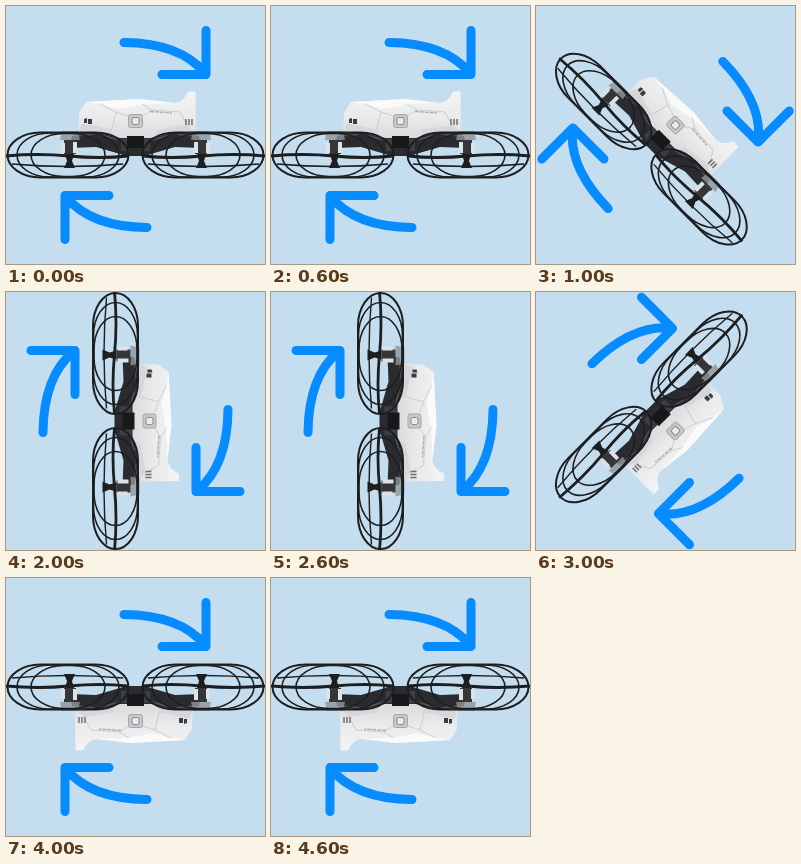
Animation, 259 px wide and 258 px high, one loop 5000 ms. Source, as an HTML page:

```html
<!DOCTYPE html>
<html lang="en">
<head>
<meta charset="utf-8">
<title>Turning drone</title>
<style>
  html, body { margin: 0; width: 100%; height: 100%; overflow: hidden; background: #c4ddef; }
  svg { display: block; width: 259px; height: 258px; }
</style>
</head>
<body>
<svg viewBox="0 0 259 258">
  <defs>
    <linearGradient id="shell" x2="0" y2="1">
      <stop offset="0" stop-color="#f4f4f5"/>
      <stop offset=".55" stop-color="#e9eaeb"/>
      <stop offset="1" stop-color="#d8dadc"/>
    </linearGradient>
    <g id="arrow" fill="none" stroke="#078cff" stroke-width="9" stroke-linecap="round" stroke-linejoin="round">
      <path d="M118 36.500Q174 37 199 67M156 68.500H200V24.500"/>
    </g>
    <g id="cage" fill="none" stroke="#1d1e20">
      <!-- motor post and rotor -->
      <path d="M56 125H72L74 134H54Z" fill="#8f9699" stroke="none" opacity=".8"/>
      <path d="M58 134H70V148H58Z" fill="#34363a" stroke="none"/>
      <path d="M55 137H59V147H55ZM67 136H71V147H67Z" fill="#dfe2e4" stroke="none"/>
      <path d="M59 148H68L66 155L69 162H58L61 155Z" fill="#1d1e20" stroke="none"/>
      <path d="M0 150Q32 147 63 150Q94 153 122 150" stroke-width="2.800"/>
      <!-- guard hoops -->
      <g id="hoops"></g>
      <path d="M6 158Q62 163 117 158" stroke-width="1.400"/>
    </g>
  </defs>
  <g id="scene">
    <use href="#arrow"/>
    <use href="#arrow" transform="rotate(180 129.500 129)"/>

    <path d="M72 126L73 107L80 96L134 93L168 97Q178 96 182 85.500H189.500L190 126L151 133H108Z" fill="url(#shell)"/>
    <path d="M80 96L134 93L168 97L139 98L112 103L94 98Z" fill="#fafafa"/>
    <path d="M94 98L110 106L105 127M136 98L146 104L174 106L182 121M110 106L122 110M136 110L146 104" fill="none" stroke="#cccecf"/>
    <path d="M144 105.500L166 107" stroke="#b0b3b5" stroke-width="1.500" stroke-dasharray="4 1"/>
    <path d="M72 126L76 117L106 124L108 133ZM190 126L180 119L151 124V133Z" fill="#d5d7d9"/>
    <path d="M78 113L81 112V117H78ZM82 113H86V118H82Z" fill="#3b3d40"/>
    <path d="M180 113V119M183 113V119M186 113V119" stroke="#6d7174" stroke-width="1.500"/>

    <path d="M114 132L90 126L66 130L64 142L90 141L114 148L119 150H140L145 148L169 141L195 142L193 130L169 126L145 132Z" fill="#2a2b2e"/>
    <path d="M70 130L90 128L114 134M145 134L169 128L189 130" fill="none" stroke="#55585c" stroke-width="1.300"/>
    <path d="M121 130H138V142H121Z" fill="#17181a"/>
    <path d="M115 133H121V145H115ZM138 133H144V145H138Z" fill="#3c3e41"/>
    <rect x="122.500" y="108.500" width="14" height="13" rx="2" fill="#c6c8ca" stroke="#a5a8aa"/>
    <rect x="126" y="111.500" width="7" height="7" rx="1.500" fill="#e9eaeb" stroke="#85888b"/>

    <use href="#cage"/>
    <use href="#cage" transform="matrix(-1 0 0 1 259 0)"/>
  </g>
</svg>
<script>
  const scene = document.getElementById('scene');
  const hoops = document.getElementById('hoops');

  // Nested hoops shrink towards the rotor.
  for (const [rx, ry, width] of [[60.5, 22.5, 2], [51, 22, 1.6], [37, 21.5, 1.6]]) {
    const hoop = document.createElementNS('http://www.w3.org/2000/svg', 'rect');
    const shape = {
      x: 62 - rx, y: 149 - ry, width: 2 * rx, height: 2 * ry,
      rx: Math.min(rx, 33), ry, 'stroke-width': width
    };
    for (const key in shape) hoop.setAttribute(key, shape[key]);
    hoops.append(hoop);
  }

  const start = performance.now();
  function draw() {
    const step = Math.floor((performance.now() - start) % 5000 / 1000);
    scene.setAttribute('transform', `rotate(${step * 45} 129.5 129)`);
    requestAnimationFrame(draw);
  }
  draw();
</script>
</body>
</html>
```
